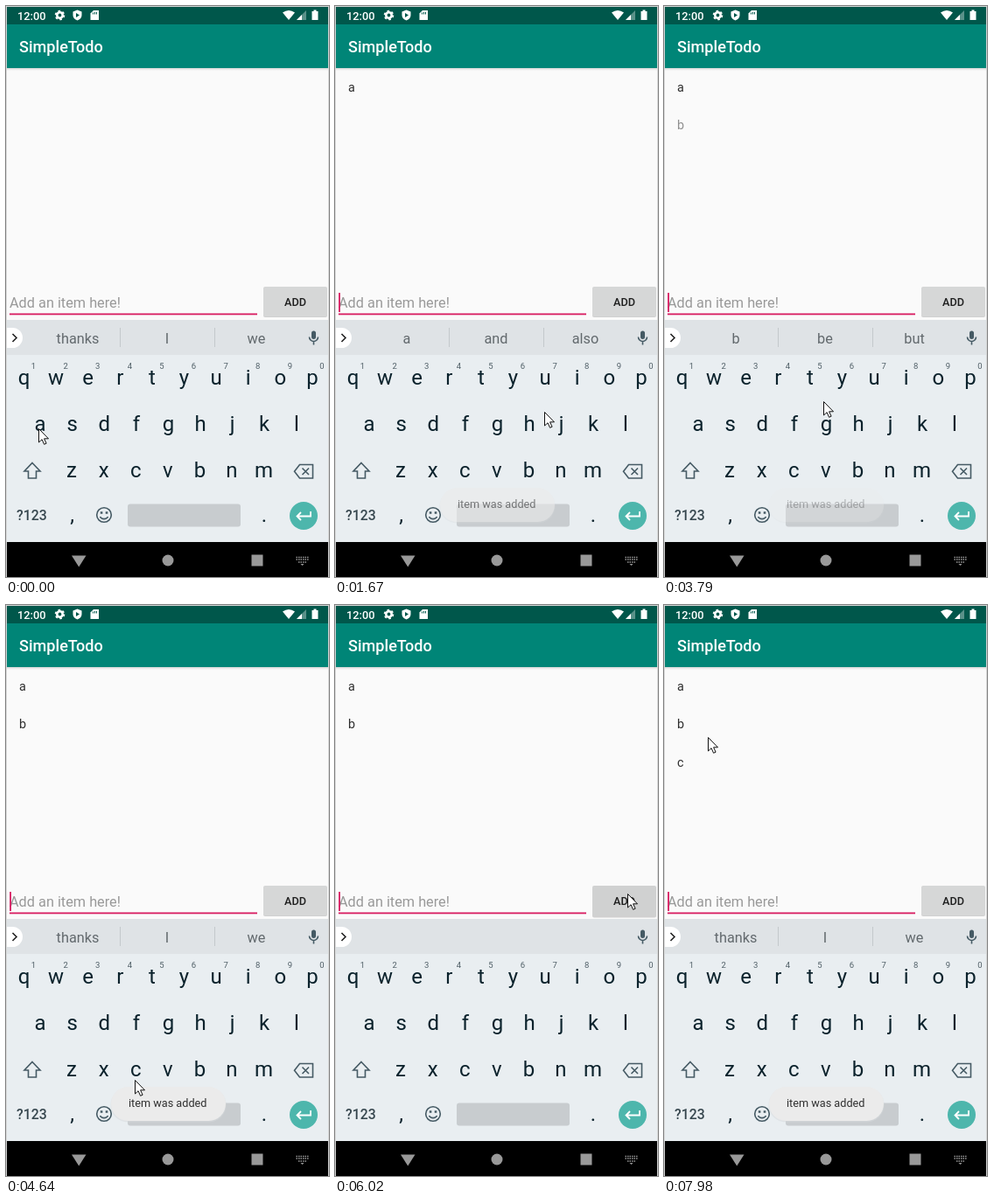
An HTML page for the animation above (8 s loop, 369 by 653 pixels).

```html
<!DOCTYPE html>
<html lang="en">
<head>
<meta charset="utf-8">
<title>To-do list</title>
<style>
  html, body { margin: 0; width: 100%; height: 100%; overflow: hidden; background: #fafafa; }
  svg { display: block; width: 369px; height: 653px; font-family: Roboto, sans-serif; }
  .mid { text-anchor: middle; }
  .bold { font-weight: 500; }
  .line { fill: none; stroke: #455a64; stroke-width: 1.6; }
  #keys { font-size: 24px; fill: #0b222c; }
  #digits { font-size: 9.5px; fill: #4f5e66; }
  #words { font-size: 16.3px; fill: #62696d; }
  #items { font-size: 14.4px; fill: #303030; }
</style>
</head>
<body>
<svg viewBox="0 0 369 653">
  <rect width="369" height="653" fill="#fafafa"/>

  <!-- status bar and title -->
  <linearGradient id="shade" x2="0" y2="1"><stop stop-color="#d8d8d8"/><stop offset="1" stop-color="#fafafa"/></linearGradient>
  <rect y="71" width="369" height="3" fill="url(#shade)"/>
  <rect width="369" height="21" fill="#00574b"/>
  <rect y="21" width="369" height="50" fill="#008577"/>
  <g fill="#fff">
    <text class="bold" x="13" y="15.5" font-size="12.8">12:00</text>
    <circle cx="61.5" cy="10.5" r="3.2" fill="none" stroke="#fff" stroke-width="2.6"/>
    <circle cx="61.5" cy="10.5" r="4.9" fill="none" stroke="#fff" stroke-width="1.8" stroke-dasharray="2.6 2.53"/>
    <path d="M81.5 4.5l5 2v4c0 3-2 5-5 6c-3-1-5-3-5-6v-4z"/>
    <path d="M80 8l4 2.5l-4 2.5z" fill="#00574b"/>
    <path d="M100 5h6v11h-9.5v-7.5z"/>
    <path d="M99.5 7.5v2M101.5 7v2.5M103.5 7v2.5" stroke="#00574b"/>
    <path d="M316 7.5q7-5 14 0l-7 8.500z"/>
    <path d="M343 5v11h-11z" opacity=".35"/><path d="M338 10v6h-6z"/>
    <path d="M349.5 6h2v-1.500h3v1.500h2v10h-7z"/>
    <text class="bold" x="15" y="53" font-size="18.1">SimpleTodo</text>
  </g>

  <g id="items"></g>

  <!-- entry field and button -->
  <text id="hint" x="4" y="345" font-size="16.3" fill="#999">Add an item here!</text>
  <text id="draft" x="4" y="345" font-size="16.3" fill="#222" text-decoration="underline"></text>
  <rect x="4" y="351.500" width="283" height="1.800" fill="#d81b60"/>
  <rect id="caret" y="328" width="1.800" height="22" fill="#d81b60"/>
  <rect id="shadow" x="294" width="73" height="34" rx="2" fill="#b4b4b4" opacity=".6"/>
  <rect id="button" x="294" y="321" width="73" height="34" rx="2"/>
  <text class="mid bold" x="330.500" y="342.700" font-size="12.7" fill="#202020">ADD</text>

  <!-- keyboard -->
  <rect y="359" width="369" height="254" fill="#e9eef1"/>
  <rect y="359" width="369" height="40" fill="#dfe3e6"/>
  <path d="M1 368h6.500a11.500 11.500 0 0 1 0 23h-6.500z" fill="#fff"/>
  <path d="M7.500 375l4.500 4.500l-4.500 4.500" class="line" style="stroke:#222"/>
  <g id="words"></g>
  <path id="dividers" d="M130.500 368v22M238.500 368v22" stroke="#c3c9cc"/>
  <rect x="349" y="371.500" width="5" height="9.500" rx="2.500" fill="#455a64"/>
  <path d="M346.500 378.500a5 5 0 0 0 10 0M351.500 384v3.500" class="line"/>
  <g id="keys"></g>
  <g id="digits"></g>
  <path d="M30 522.500l9 9.500h-4.500v8h-9v-8h-4.500z" class="line"/>
  <path d="M335.500 524.500h15v15.500h-15l-6-7.750zM338.500 528.500l7.500 7.500M346 528.500l-7.500 7.500" class="line"/>
  <text class="bold" x="12" y="588" font-size="15.8" fill="#37474f">?123</text>
  <circle cx="112" cy="582" r="8.300" class="line"/>
  <path d="M107.500 584a4.800 4 0 0 0 9 0" class="line"/>
  <path d="M107.800 579.500h2.600M113.700 579.500h2.600" class="line" style="stroke-width:2.400"/>
  <rect x="139" y="569.500" width="129" height="26" rx="3" fill="#c8cccf"/>
  <circle cx="340" cy="583" r="16" fill="#4db6ac"/>
  <path d="M348 578v5.500h-15.500M337 579l-4.500 4.500l4.500 4.500" class="line" style="stroke:#fff;stroke-width:1.800"/>

  <!-- navigation bar -->
  <rect y="613" width="369" height="40"/>
  <g fill="#999">
    <path d="M75 628.500h16.500l-8.250 13z"/>
    <circle cx="185" cy="634" r="6.500"/>
    <rect x="280.500" y="627.500" width="13" height="13"/>
    <path d="M331.500 630.500h14M331.500 633h14M334 636h9" fill="none" stroke="#999" stroke-width="1.500" stroke-dasharray="1.500 1"/>
    <path d="M336.500 638h4l-2 2z"/>
  </g>

  <g id="toast">
    <rect x="119.500" y="552" width="132" height="39.500" rx="19.700" fill="#d5d9dc" opacity=".5"/>
    <rect x="120" y="551" width="131" height="39" rx="19.500" fill="#ebebeb"/>
    <text x="140" y="574" font-size="12.7" fill="#303030">item was added</text>
  </g>

  <path d="M.5 0V653M368.500 0V653M0 .5H369" stroke="#d4d4d4" fill="none"/>
  <path id="mouse" d="M.5.5v15.500l3.600-3.300l2.500 5.600l2.500-1.100l-2.500-5.400h4.900z" fill="#fff" stroke="#111"/>
</svg>
<script>
const LOOP = 8000, STEP = 134, PHASE = 36; // the picture refreshes every STEP ms
const CLICK = 220;                         // from pressing ADD to the new list item
const IDLE = 'thanks I we';

// Each round: type a letter, add it to the list, then the suggestions refresh.
const rounds = [
  { letter: 'a', words: 'a and also', typed: 420, added: 1490, refresh: 1750 },
  { letter: 'b', words: 'b be but', typed: 2460, added: 3710, refresh: 3900 },
  { letter: 'c', words: 'c can call', typed: 4640, added: 6140, refresh: 5900 },
];

// Pointer strokes: start, end, x, y of the place reached.
const strokes = [
  [0, 130, 40, 484], [420, 1100, 320, 336], [1380, 2180, 219, 530], [2460, 3240, 331, 338],
  [3520, 3780, 184, 449], [3780, 4480, 147, 543], [4640, 5260, 342, 303], [5320, 5600, 334, 330],
  [6020, 6530, 239, 554], [7320, 7940, 50, 151],
];

const $ = id => document.getElementById(id);
const set = (id, name, value) => $(id).setAttribute(name, value);
const ramp = (t, start, length) => Math.min(1, Math.max(0, (t - start) / length));
const easeOut = (p, power) => 1 - (1 - p) ** power;

const label = (x, y, s) => `<text class="mid" x="${x}" y="${y}">${s}</text>`;
const row = (chars, x, y) => [...chars].map((c, i) => label(x + 36.6 * i, y, c)).join('');
$('keys').innerHTML = row('qwertyuiop', 20.5, 433) + row('asdfghjkl', 39, 486) +
  row('zxcvbnm', 75, 539) + label(75.5, 590, ',') + label(295, 590, '.');
$('digits').innerHTML = row('1234567890', 31.5, 415);
$('items').innerHTML = rounds.map((r, i) => `<text x="15" y="${98 + 43.3 * i}">${r.letter}</text>`).join('');
$('words').innerHTML = [0, 1, 2].map(i => label(82 + 102 * i, 385.5, '')).join('');

function pointerAt(t) {
  let x = 37, y = 483;
  for (const [start, end, toX, toY] of strokes) {
    const p = ramp(t, start, end - start);
    x += (toX - x) * easeOut(p, 4);
    y += (toY - y) * easeOut(p, 2.7);
  }
  return [Math.round(x), Math.round(y)];
}

function draw(time) {
  const t = Math.max(0, Math.floor((time - PHASE) / STEP) * STEP + PHASE);
  set('mouse', 'transform', `translate(${pointerAt(t)})`);

  const round = rounds.filter(r => r.typed <= t).pop();
  const cleared = round && round.added - CLICK;
  const draft = round && t < cleared ? round.letter : '';
  $('draft').textContent = draft;
  set('hint', 'opacity', draft ? 0 : 1);

  // The caret starts visible after each edit and blinks twice a second.
  const idleTime = round ? t - (draft ? round.typed : cleared) : 500;
  set('caret', 'opacity', 1 - Math.floor(idleTime / 500) % 2);
  set('caret', 'x', draft ? 12.6 : 4.2);

  let words = IDLE;
  if (round && t < round.refresh) words = round.words;
  else if (round && t < round.refresh + 200) words = '';
  const parts = words.split(' ');
  [...$('words').children].forEach((el, i) => el.textContent = parts[i] || '');
  set('dividers', 'opacity', words ? 1 : 0);

  [...$('items').children].forEach((el, i) => el.setAttribute('opacity', ramp(t, rounds[i].added, 150)));
  const toastAlpha = r => ramp(t, r.added, 260) - ramp(t, r.added + 1950, 260);
  set('toast', 'opacity', Math.max(...rounds.map(toastAlpha)));

  const pressed = round && t >= cleared && t < round.added;
  set('button', 'fill', pressed ? '#d0d1d1' : '#d6d7d7');
  set('shadow', 'y', pressed ? 323.5 : 322);
}

function loop() {
  draw(performance.now() % LOOP);
  requestAnimationFrame(loop);
}
loop();
</script>
</body>
</html>
```
